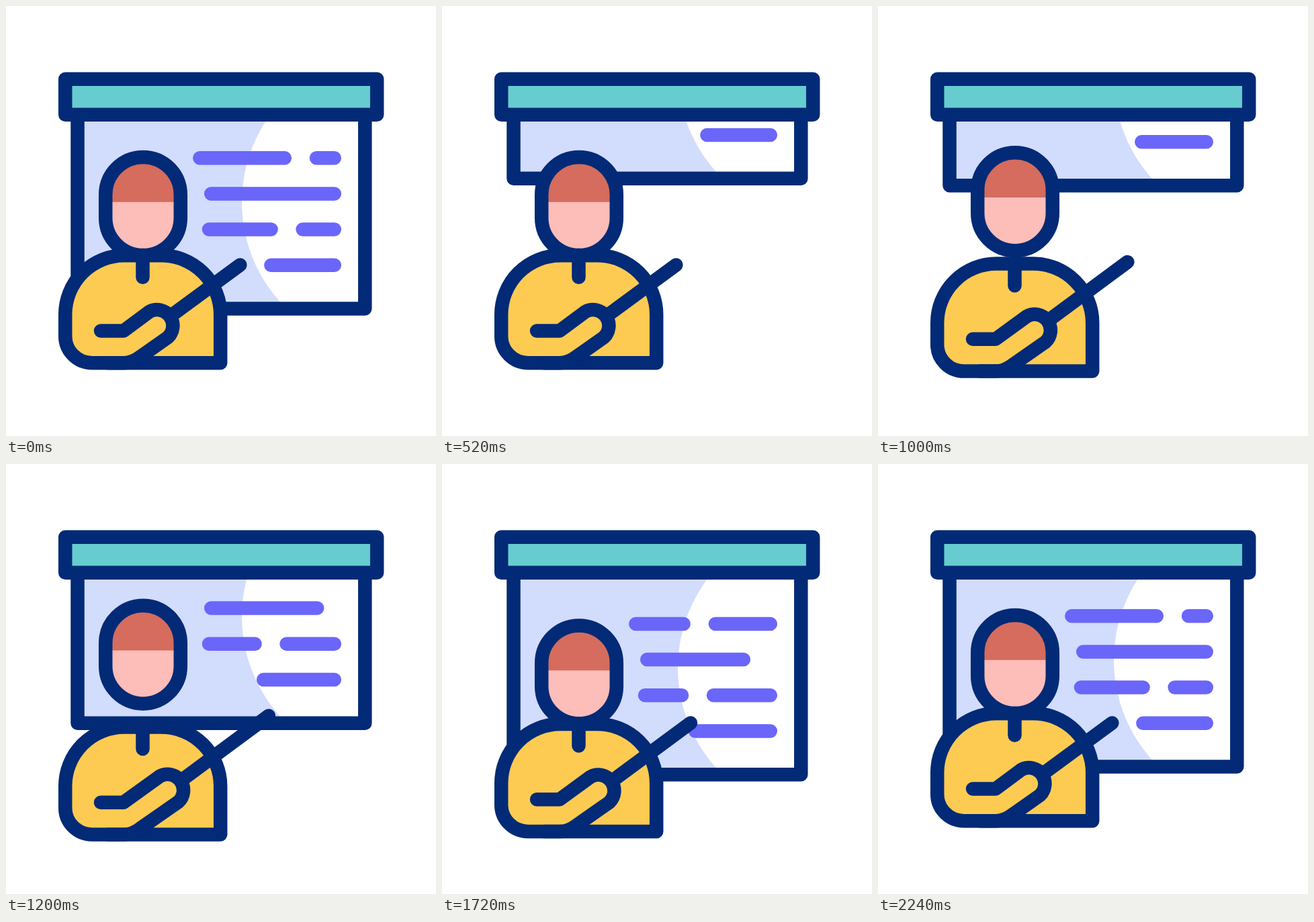
Write an HTML page that moves like this. It is 640x640 px and loops after 2.6 s.

```html
<!DOCTYPE html>
<html lang="en">
<head>
<meta charset="utf-8">
<title>Presentation</title>
<style>
html, body { margin: 0; height: 100%; overflow: hidden; background: #fff; }
svg { display: block; width: 100%; height: 100%; }
.ink { stroke: #022a76; }
.text { stroke: #6a66fa; }
</style>
</head>
<body>
<svg viewBox="0 0 640 640" fill="none" stroke-width="20.5" stroke-linecap="round" stroke-linejoin="round">
  <defs>
    <clipPath id="belowBar"><rect y="162" width="640" height="478"/></clipPath>
    <clipPath id="sheet"><rect x="106.5" y="0" width="427.8" height="450.5"/></clipPath>
  </defs>
  <g clip-path="url(#belowBar)">
    <g id="screen">
      <g clip-path="url(#sheet)">
        <rect width="640" height="640" fill="#d2dcfd"/>
        <circle cx="573" cy="292" r="222" fill="#fff"/>
      </g>
      <path id="lines" class="text"/>
      <path class="ink" d="M106.5 0V450.6H534.3V0"/>
    </g>
  </g>
  <rect class="ink" x="88.2" y="108.8" width="464" height="52.9" fill="#67cccf"/>
  <g id="head">
    <rect x="148.2" y="225" width="111.6" height="146" rx="55.8" fill="#fdbdb9"/>
    <path d="M148.2 291.8V280.8A55.8 55.8 0 0 1 259.8 280.8V291.8Z" fill="#d56c5d"/>
    <rect class="ink" x="148.2" y="225" width="111.6" height="146" rx="55.8"/>
  </g>
  <g id="body" class="ink">
    <path fill="#fecb52" d="M319.2 531.2H128A39.8 39.8 0 0 1 88.2 491.4V459A88 88 0 0 1 176 371.2H231.4A88 88 0 0 1 319.2 459Z"/>
    <path d="M203.5 371V403.8"/>
    <path id="arm"/>
    <path id="stick"/>
  </g>
</svg>
<script>
const el = id => document.getElementById(id);
const LOOP = 2600, STEP = 40;

// Keys are [time, value] pairs, eased in and out between neighbours.
function track(keys, t) {
  const i = keys.findIndex(k => k[0] > t);
  if (i < 0) return keys[keys.length - 1][1];
  if (i === 0) return keys[0][1];
  const [t0, a] = keys[i - 1], [t1, b] = keys[i];
  const x = (t - t0) / (t1 - t0);
  return a + (b - a) * x * x * (3 - 2 * x);
}

const screenY = [[0, 0], [212, 18], [700, -288], [1475, 25.5], [1940, 0]];
const bodyY = [[620, 0], [1320, 22], [1440, 22], [2240, 0]];
const headLift = [[720, 0], [1250, -35.5], [1750, 0]];
const reach = [[700, 0], [1300, 1], [1460, 1], [1960, 0]];
const retype = [[880, 0], [1510, 1], [2240, 0]];

const moveY = (id, y) => el(id).setAttribute("transform", `translate(0 ${y})`);
const draw = (id, d) => el(id).setAttribute("d", d);
const dash = (y, x1, x2) => `M${x1} ${y}H${x2}`;

function render(t) {
  const y = track(bodyY, t), r = track(reach, t), k = track(retype, t);
  moveY("screen", track(screenY, t));
  moveY("body", y);
  moveY("head", y + track(headLift, t));

  draw("lines",
    dash(226.2, 288.3, 414.8 - 69 * k) + dash(226.2, 462 - 69 * k, 488.8) +
    dash(279.4, 305.2, 488.8 - 50 * k) +
    dash(332.6, 302, 394.6 - 47 * k) + dash(332.6, 441.6 - 47 * k, 488.8) +
    dash(385.8, 394.4 - 22 * k, 488.8));

  const hx = 17 * r, hy = -11.5 * r;
  draw("arm", `M141 483.4H175L${213.4 + hx} ${455 + hy}` +
    `A23.7 23.7 0 0 1 ${240.6 + hx} ${493.4 + hy}L200 522Q188 531.2 175 531.2H152`);
  draw("stick", `M${249 + hx} ${458.5 + hy}L${348.3 + 46 * r} ${385.4 - 33.5 * r}`);
}

const start = performance.now();
function tick() {
  const t = (performance.now() - start) % LOOP;
  render(Math.floor(t / STEP) * STEP);
  requestAnimationFrame(tick);
}
tick();
</script>
</body>
</html>
```
